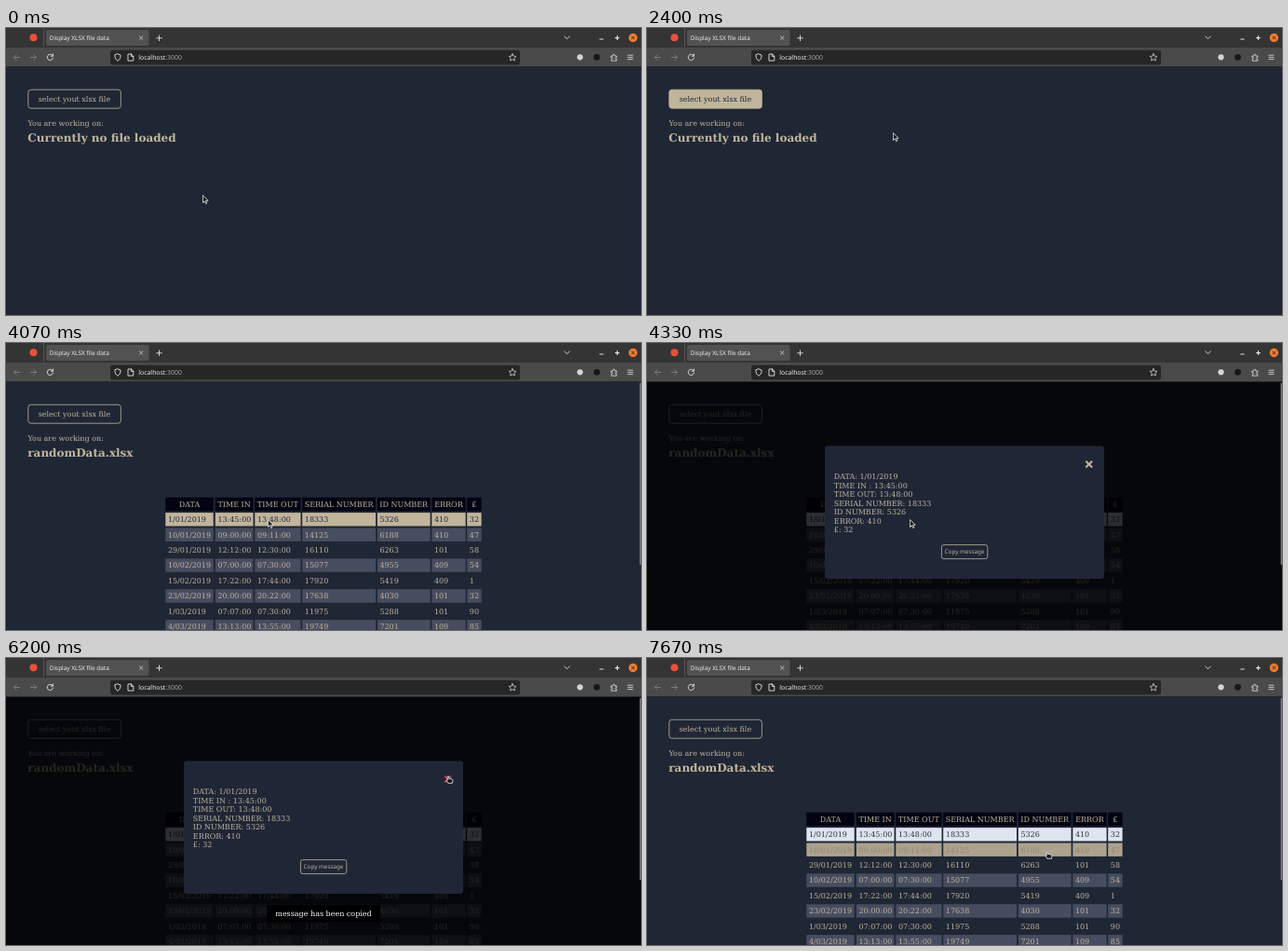
Animation, 682 px wide and 308 px high, one loop 8 s. Source, as an HTML page:

```html
<!DOCTYPE html>
<html lang="en">
<head>
<meta charset="utf-8">
<title>Display XLSX file data</title>
<style>
  html, body { margin: 0; width: 100%; height: 100%; overflow: hidden; background: #1f2634; }
  svg { display: block; width: 100vw; height: 100vh; --sand: #c1b59c; --navy: #1f2634; }
  text { fill: currentColor; font: 8px "DejaVu Serif", serif; text-rendering: geometricPrecision; white-space: pre; }
  .ui { font-family: "Noto Sans", sans-serif; }
  .page { color: var(--sand); }
  .title { font-size: 12px; font-weight: bold; }
  .line { fill: none; stroke: #e4e4e4; stroke-width: .9; stroke-linecap: round; stroke-linejoin: round; }
  .dim { stroke: #808080; }
  .outline { stroke: var(--sand); stroke-width: .8; }

  .anim, .fade { animation: 8s step-end infinite; }
  .fade { animation-timing-function: linear; }

  #pick { animation-name: pick; }
  @keyframes pick {
    0%, 39.1% { fill: transparent; color: var(--sand); }
    10.8% { fill: var(--sand); color: var(--navy); }
  }
  #empty { animation-name: empty; }
  @keyframes empty { 0% { opacity: 1; } 32.5%, 100% { opacity: 0; } }
  #loaded { animation-name: loaded; }
  @keyframes loaded { 0% { opacity: 0; } 32.5%, 100% { opacity: 1; } }
  #modal { animation-name: modal; }
  @keyframes modal { 0%, 79.1% { opacity: 0; } 54.1% { opacity: 1; } }
  #copy { animation-name: copy; }
  @keyframes copy {
    0%, 71.6% { fill: transparent; color: var(--sand); }
    64.9% { fill: var(--sand); color: var(--navy); }
  }
  #close { animation-name: close; }
  @keyframes close { 0%, 79.1% { stroke: var(--sand); } 74.9% { stroke: #c0434b; } }
  #toast { animation-name: toast; }
  @keyframes toast { 0%, 79.1% { opacity: 0; } 68.3% { opacity: 1; } }

  .row { fill: transparent; }
  .row.even { fill: #474d60; }
  #row1 { animation-name: row1; }
  @keyframes row1 {
    0%, 42.4% { fill: rgba(193, 181, 156, 0); color: var(--sand); }
    46.5%, 54% { fill: var(--sand); color: var(--navy); }
    54.1%, 100% { fill: #dfe5ee; color: #283040; }
  }
  #row2 { animation-name: row2; }
  @keyframes row2 {
    0%, 94.1% { fill: #474d60; color: var(--sand); }
    95.8%, 100% { fill: #aca28e; color: #91886f; }
  }

  #pointer { animation-name: move; }
  @keyframes move {
    0% { transform: translate(211px, 179px); }
    2.5% { transform: translate(211px, 179px); animation-timing-function: steps(9, start); }
    10.8% { transform: translate(103px, 83px); animation-timing-function: steps(4, start); }
    15% { transform: translate(88px, 76px); }
    15.8% { transform: translate(95px, 78px); animation-timing-function: steps(4, start); }
    19.1% { transform: translate(235px, 117px); animation-timing-function: steps(3, start); }
    21.6% { transform: translate(262px, 128px); }
    30% { transform: translate(264px, 112px); }
    34.1% { transform: translate(263px, 105px); }
    39.1% { transform: translate(275px, 162px); }
    42.4% { transform: translate(279px, 185px); }
    46.6% { transform: translate(280px, 188px); }
    50.8% { transform: translate(281px, 189px); }
    54.1% { transform: translate(282px, 189px); }
    57.4% { transform: translate(385px, 158px); }
    60% { transform: translate(468px, 128px); }
    62.5% { transform: translate(402px, 188px); }
    64.9% { transform: translate(343px, 221px); }
    71.6% { transform: translate(454px, 135px); }
    74.9% { transform: translate(474px, 128px); }
    77.4% { transform: translate(475px, 126px); }
    83.3% { transform: translate(468px, 138px); }
    85.8% { transform: translate(453px, 161px); }
    88.3% { transform: translate(441px, 188px); }
    91.6% { transform: translate(434px, 212px); }
    94.1% { transform: translate(429px, 208px); }
    95.8%, 100% { transform: translate(430px, 207px); }
  }
  #arrow { animation-name: arrow; }
  @keyframes arrow {
    0%, 15.8%, 71.6%, 79.1% { opacity: 1; }
    10.8%, 64.9%, 74.9%, 88.3%, 100% { opacity: 0; }
  }
  #hand { animation-name: hand; }
  @keyframes hand {
    0%, 15.8%, 71.6%, 79.1% { opacity: 0; }
    10.8%, 64.9%, 74.9%, 88.3%, 100% { opacity: 1; }
  }
</style>
</head>
<body>
<svg viewBox="0 0 682 308" preserveAspectRatio="none">
  <rect width="682" height="308" fill="#1f2634"/>

  <g class="page">
    <g id="pick" class="anim">
      <rect class="outline" x="23.8" y="66.2" width="99.6" height="20" rx="3"/>
      <text x="34.7" y="79">select yout xlsx file</text>
    </g>
    <text x="23.5" y="105">You are working on:</text>
    <text id="empty" class="title anim" x="23.3" y="121.8">Currently no file loaded</text>
    <g id="loaded" class="anim">
      <text class="title" x="23.3" y="121.8">randomData.xlsx</text>
      <g id="table"></g>
    </g>

    <g id="modal" class="anim">
      <rect y="42" width="682" height="266" opacity=".8"/>
      <rect x="191" y="110.5" width="300" height="142.5" rx="3" fill="#1f2636"/>
      <path id="close" class="anim" d="M471.3 126.7l6.8 6.8m0-6.8l-6.8 6.8" stroke-width="2"/>
      <g id="details"></g>
      <g id="copy" class="anim">
        <rect class="outline" x="316.4" y="216.6" width="49.4" height="15" rx="2.5"/>
        <text class="ui" x="319.6" y="226.3" style="font-size:6.3px">Copy message</text>
      </g>
    </g>
    <g id="toast" class="anim" color="#fff">
      <rect x="280" y="265" width="122" height="18"/>
      <text x="289.3" y="276.9">message has been copied</text>
    </g>
    <g class="anim" style="animation-name:loaded">
      <rect x="680.6" y="43" width="1.4" height="195" fill="#7b7e85"/>
    </g>
  </g>

  <!-- browser frame -->
  <rect width="682" height="21.5" fill="#343434"/>
  <rect y="21" width="682" height="20.5" fill="#4a4a4a"/>
  <rect y="41" width="682" height=".7" fill="#252525"/>
  <rect x="40.2" y="0" width=".7" height="20" fill="#666"/>
  <circle cx="29.5" cy="10.3" r="4" fill="#e8503a"/>
  <rect x="43" y="2" width="110.5" height="17" rx="2" fill="#525252"/>
  <rect x="112" y="23.7" width="440" height="15.8" rx="2.5" fill="#262626"/>
  <g color="#ececec">
    <text class="ui" x="46.7" y="12.7" style="font-size:6.45px">Display XLSX file data</text>
    <text class="ui" x="142.3" y="33.9" style="font-size:6.86px">localhost<tspan fill="#a6a6a6">:3000</tspan></text>
  </g>
  <g class="line">
    <path d="M143.4 8.7l3.6 3.6m0-3.6l-3.6 3.6" stroke-width=".7"/>
    <path d="M161.7 10.8h5.6m-2.8-2.8v5.6"/>
    <path d="M599.8 9l2.7 2.7 2.7-2.7"/>
    <path d="M637.8 12h3.4M654.6 10.6h3.8m-1.9-1.9v3.8" stroke-width="1.2"/>
    <path class="dim" d="M14.6 31.5H8.4m2.8-2.8l-2.8 2.8 2.8 2.8M26.4 31.5h6.2m-2.8-2.8l2.8 2.8-2.8 2.8"/>
    <path d="M50 29.5a3.2 3.2 0 1 0 .6 2.5M50.5 28v2.2h-2.2"/>
    <path d="M120 27.9l3.1 1.2c0 3-.8 4.7-3.1 6.2-2.3-1.5-3.1-3.2-3.1-6.2z"/>
    <path d="M131.4 28h3.2l2.2 2.2v4.9h-5.4zM134.4 28v2.4h2.4"/>
    <path d="M544 27.6l1.2 2.5 2.7.3-2 1.9.5 2.7-2.4-1.3-2.4 1.3.5-2.7-2-1.9 2.7-.3z" stroke-width=".7"/>
    <path d="M650.2 30h1.7c-.7-2.4 2.5-2.4 1.9 0h2v1.8c-1.9-.5-1.9 2 0 1.6v1.8h-5.6v-1.9c1.8.4 1.8-2.1 0-1.6z" stroke-width=".8"/>
    <path d="M667.9 29.2h5.2m-5.2 2.2h5.2m-5.2 2.2h5.2" stroke-width=".8"/>
  </g>
  <circle cx="616.5" cy="31.3" r="3.1" fill="#d5d5d5"/>
  <circle cx="634.5" cy="31.3" r="3.4" fill="#171717"/>
  <circle cx="673.4" cy="10.5" r="4.7" fill="#ee7b32"/>
  <path d="M671.8 8.9l3.2 3.2m0-3.2l-3.2 3.2" stroke="#2b1a10" stroke-width=".9"/>

  <g id="pointer" class="anim" fill="#191919" stroke="#f2f2f2" stroke-width=".8" stroke-linejoin="round">
    <path id="arrow" class="anim" d="M.4.5v8l1.9-1.7 1.3 2.8 1.3-.6-1.3-2.7h2.5z"/>
    <path id="hand" class="anim" d="M-.7 5V1.2q.7-1.2 1.4 0v2.2l3.4.7q.9.3.8 1.2l-.5 3H-.1L-2 5.7q0-1 1.3-.7z"/>
  </g>
</svg>

<script>
  const columns = [
    ["DATA", 171.3, 51.4], ["TIME IN", 224.8, 40.7], ["TIME OUT", 267.3, 49.2],
    ["SERIAL NUMBER", 318.2, 78.8], ["ID NUMBER", 398.8, 56.8],
    ["ERROR", 457.3, 36.3], ["£", 495.2, 15.4]
  ];
  const records = `1/01/2019 13:45:00 13:48:00 18333 5326 410 32
10/01/2019 09:00:00 09:11:00 14125 6188 410 47
29/01/2019 12:12:00 12:30:00 16110 6263 101 58
10/02/2019 07:00:00 07:30:00 15077 4955 409 54
15/02/2019 17:22:00 17:44:00 17920 5419 409 1
23/02/2019 20:00:00 20:22:00 17638 4030 101 32
1/03/2019 07:07:00 07:30:00 11975 5288 101 90
4/03/2019 13:13:00 13:55:00 19749 7201 109 85`.split("\n").map(line => line.split(" "));

  const text = (x, y, value, attrs = "") => `<text x="${x}" y="${y}" ${attrs}>${value}</text>`;
  const cell = (x, y, width) => `<rect x="${x}" y="${y}" width="${width}" height="14.4"/>`;

  const header = columns.map(([name, x, width]) =>
    cell(x, 165.8, width) + text(x + width / 2, 175.9, name, 'text-anchor="middle"')).join("");

  const rows = records.map((record, i) => {
    const y = 182.1 + i * 16.43;
    const cells = columns.map(([, x, width], c) =>
      cell(x, y, width) + text(x + 2.6, y + 10.1, record[c])).join("");
    return `<g id="row${i + 1}" class="row fade ${i % 2 ? "even" : ""}">${cells}</g>`;
  }).join("");

  document.getElementById("table").innerHTML = `<g fill="#030312">${header}</g>${rows}`;
  document.getElementById("details").innerHTML = columns.map(([name], i) =>
    text(200.8, 146.3 + i * 9.5, `${name}${name === "TIME IN" ? " " : ""}: ${records[0][i]}`)).join("");
</script>
</body>
</html>
```
